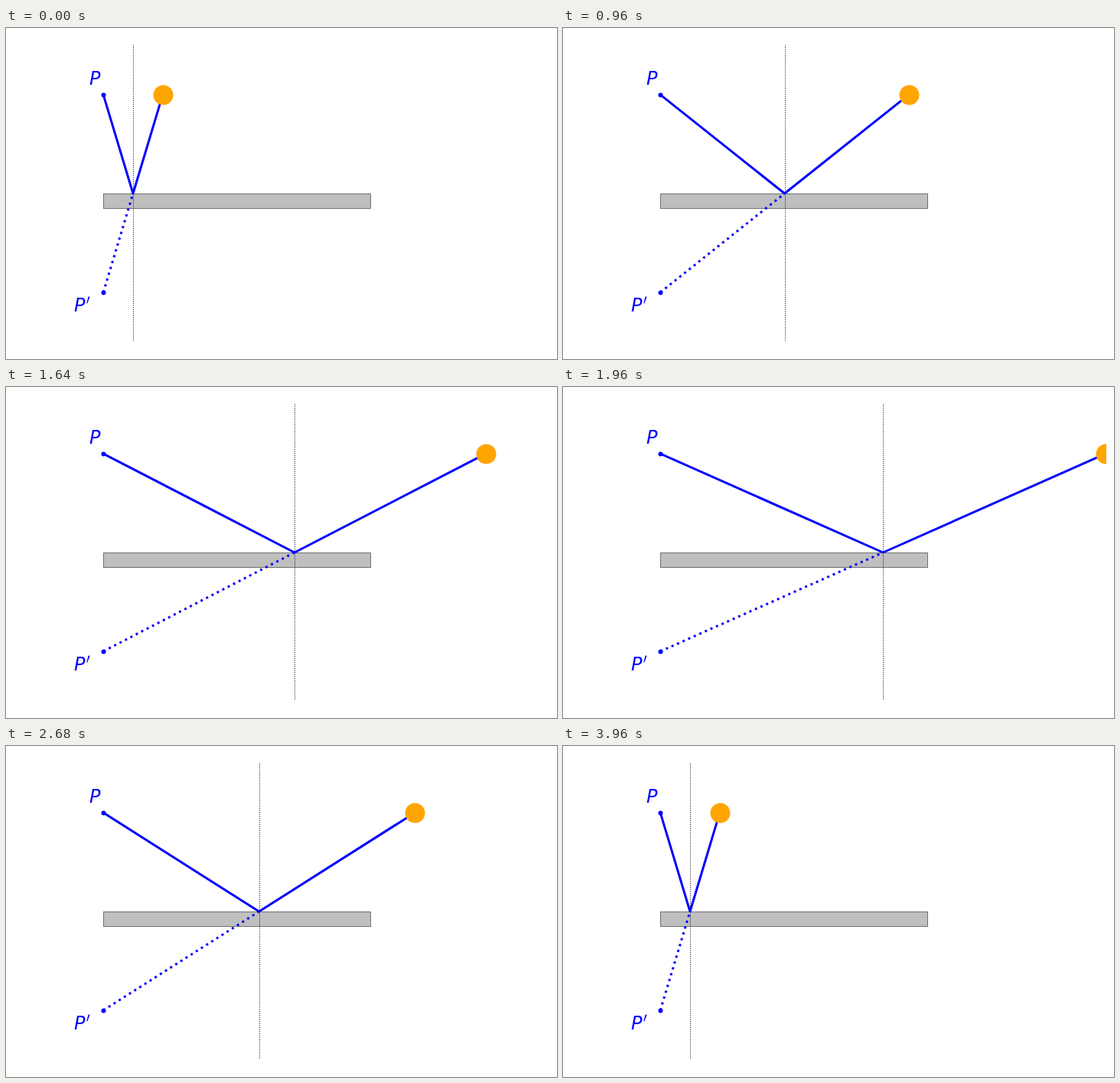
An HTML page for the animation above (4 s loop, 720 by 432 pixels).

```html
<!DOCTYPE html>
<html lang="en">
<head>
<meta charset="utf-8">
<title>Reflection in a plane mirror</title>
<style>
  html, body { margin: 0; width: 100%; height: 100%; overflow: hidden; background: #fff; }
  svg { display: block; width: 720px; height: 432px; }
  text { font: oblique 24px "DejaVu Sans", sans-serif; fill: #00f; }
  .ray { fill: none; stroke: #00f; stroke-width: 3; stroke-linejoin: round; }
</style>
</head>
<body>
<svg viewBox="0 0 720 432">
  <clipPath id="plot"><rect x="10" y="6" width="700" height="420"/></clipPath>
  <g clip-path="url(#plot)">
    <rect x="127.5" y="216.5" width="349" height="19" fill="#808080" stroke="#000" opacity="1"
          fill-opacity=".5" stroke-opacity=".5"/>
    <path id="normal" stroke="#000" stroke-dasharray="1 1.65"/>
    <path id="virtual" class="ray" stroke-dasharray="3 4.95"/>
    <path id="real" class="ray" stroke-linecap="square"/>
    <circle cx="127.5" cy="87.5" r="3" fill="#00f"/>
    <circle cx="127.5" cy="345.5" r="3" fill="#00f"/>
    <circle id="ball" cy="87.5" r="13" fill="#ffa500"/>
  </g>
  <text x="109" y="74">P</text>
  <text x="89" y="370">P</text>
  <path d="M105.3 359.2 L107.6 350.4 L109.6 350.8 L106.3 359.5 Z" fill="#00f"/>
</svg>
<script>
  const STEP_MS = 40, STEPS = 100, LAST = 49;
  const UNIT = 38.8;
  const objectX = 127.2, topY = 87.06, mirrorY = 216, imageY = 344.94;
  const byId = id => document.getElementById(id);
  const [normal, virtual, real, ball] = ['normal', 'virtual', 'real', 'ball'].map(byId);
  const snap = x => Math.floor(x + 0.5) + 0.5;

  function draw(ms) {
    const step = Math.floor(ms / STEP_MS) % STEPS;
    const progress = Math.min(step, STEPS - 1 - step) / LAST;
    const ballX = objectX + UNIT * (2 + 13 * progress);
    const hitX = (objectX + ballX) / 2;

    normal.setAttribute('d', `M${snap(hitX)} 22.5V409.5`);
    virtual.setAttribute('d', `M${objectX} ${imageY}L${hitX} ${mirrorY}`);
    real.setAttribute('d', `M${objectX} ${topY}L${hitX} ${mirrorY}L${ballX} ${topY}`);
    ball.setAttribute('cx', snap(ballX));
  }

  const start = performance.now();
  function tick() {
    draw(performance.now() - start);
    requestAnimationFrame(tick);
  }
  tick();
</script>
</body>
</html>
```
